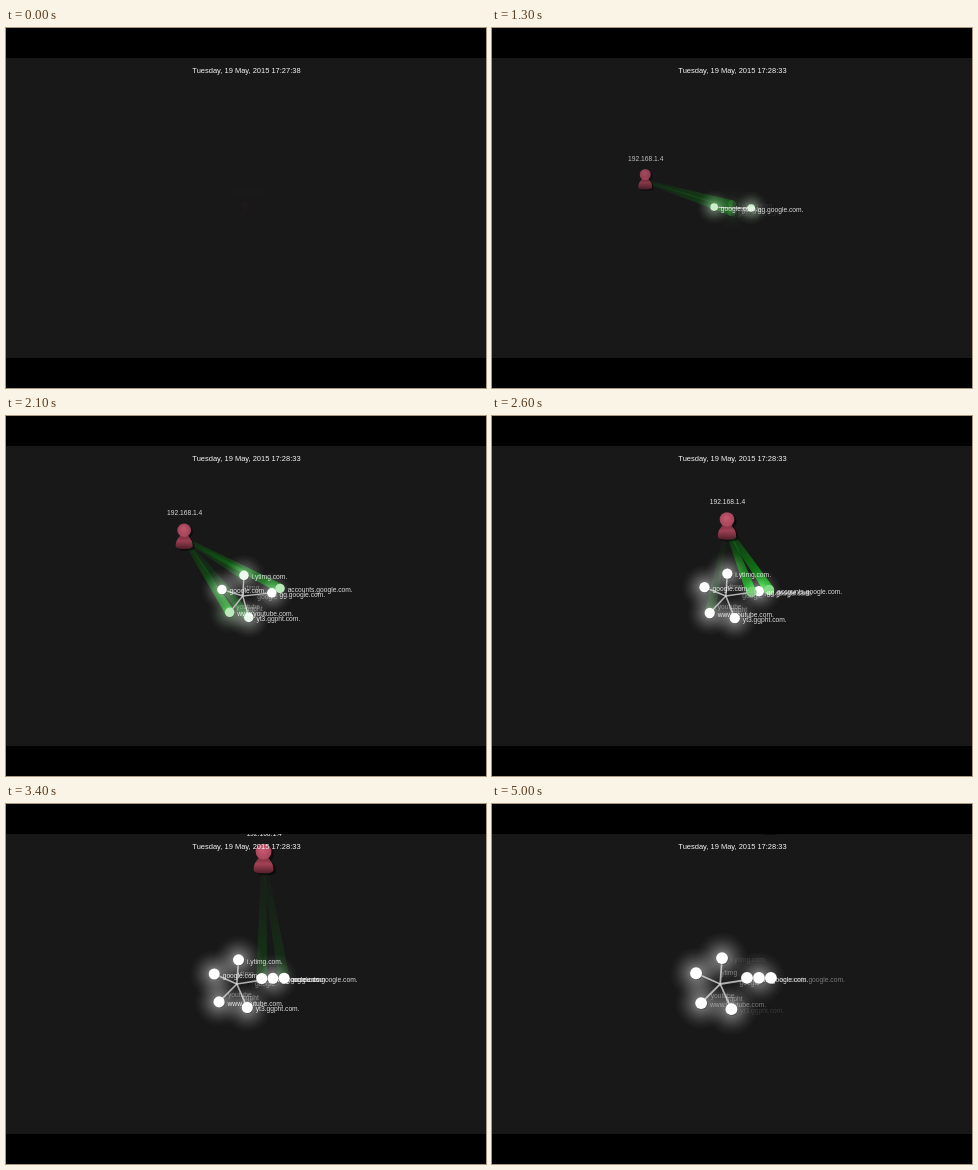
Animation of 480 by 360 pixels, one loop 5.1 s. Source, as an HTML page with a canvas:

```html
<!DOCTYPE html>
<html lang="en">
<head>
<meta charset="utf-8">
<title>Request graph</title>
<style>
  html, body { margin: 0; width: 100%; height: 100%; overflow: hidden; background: #000; }
  canvas { display: block; width: 100%; height: 100%; }
</style>
</head>
<body>
<canvas id="stage" width="480" height="360"></canvas>
<script>
const ctx = document.getElementById('stage').getContext('2d');
const LOOP = 5100, STEP = 100;
const FONT = '"Liberation Sans", Arial, sans-serif';

const clamp = v => Math.max(0, Math.min(1, v));
const ramp = (t, a, b) => clamp((t - a) / (b - a));
const settle = (t, tau) => 1 - Math.exp(-Math.max(0, t) / tau);
const mix = (a, b, u) => a.map((v, i) => v + (b[i] - v) * u);
const polar = (deg, r) => [r * Math.cos(deg * Math.PI / 180), r * Math.sin(deg * Math.PI / 180)];
const add = (p, q) => [p[0] + q[0], p[1] + q[1]];

const zoom = t => Math.max(.5, 1.1 - .53 * Math.exp(-(t - 900) / 1600));
const hub = t => [240 - 13 * settle(t - 1700, 1400), 180];

// The user wanders between these points, then drifts off the top
const stops = [
  { t: 0, at: [240, 178] }, { t: 550, at: [157, 174] }, { t: 900, at: [169, 171] },
  { t: 1700, at: [137.5, 122] }, { t: 2600, at: [235, 103.5] }
];
const exit = [280, -8];

function userPos(t) {
  const next = stops.findIndex(p => p.t > t);
  const last = stops[stops.length - 1];
  if (next < 0) return mix(last.at, exit, settle(t - last.t, 1150));
  const a = stops[next - 1], b = stops[next], u = ramp(t, a.t, b.t);
  return mix(a.at, b.at, u * u * (3 - 2 * u));
}

// Folders swing round the hub from one [angle, radius] to another
const dirs = [
  { born: 650, from: [183, 27], to: [204, 25], files: [{ name: 'google.com.' }] },
  { born: 1250, name: 'ytimg', from: [-88, 25], to: [-86, 24.5], files: [{ name: 'i.ytimg.com.', hits: [1250] }] },
  { born: 1250, name: 'ggpht', from: [92, 28], to: [66, 26], files: [{ name: 'yt3.ggpht.com.', hits: [1250] }] },
  { born: 1550, name: 'youtube', from: [115, 28], to: [135, 25.5], files: [{ name: 'www.youtube.com.', hits: [1550] }] },
  { born: 650, name: 'google', from: [0, 29], to: [-9, 37], files: [
    { name: 'gg.google.com.' },
    { name: 'accounts.google.com.', born: 1550, slot: 1, hits: [1550, 2350] },
    { name: 'www.google.com.', born: 2400, slot: -1, hits: [2400] }
  ] }
];

const swing = t => settle(t - 1700, 350);

function dirPos(d, t) {
  const [angle, r] = mix(d.from, d.to, swing(t));
  return add(hub(t), polar(angle, r * zoom(t) * settle(t - d.born, 200)));
}

// Files sharing a folder stand in a row that turns level
function filePos(f, dirAt, t) {
  const gap = 11.3 * (f.slot || 0) * zoom(t) * settle(t - f.born, 150);
  return add(dirAt, polar(-90 * (1 - swing(t)), gap));
}

function text(str, x, y, size, alpha, align = 'left') {
  if (alpha <= 0) return;
  ctx.font = size + 'px ' + FONT;
  ctx.textAlign = align;
  ctx.fillStyle = `rgba(255,255,255,${alpha})`;
  ctx.fillText(str, x, y);
}

function disc(x, y, r, fill) {
  ctx.fillStyle = fill;
  ctx.beginPath();
  ctx.arc(x, y, r, 0, 7);
  ctx.fill();
}

function drawGlow([x, y], r, rgb, alpha) {
  const g = ctx.createRadialGradient(x, y, 0, x, y, r);
  for (let i = 0; i <= 5; i++) {
    g.addColorStop(i / 5, `rgba(${rgb},${alpha * (1 - i / 5) ** 1.5})`);
  }
  disc(x, y, r, g);
}

function drawBeam([x0, y0], [x1, y1], s, alpha) {
  const g = ctx.createLinearGradient(x0, y0, x1, y1);
  g.addColorStop(0, `rgba(0,150,10,${alpha * .15})`);
  g.addColorStop(1, `rgba(10,195,20,${alpha})`);
  const len = Math.hypot(x1 - x0, y1 - y0);
  ctx.save();
  ctx.fillStyle = g;
  ctx.beginPath();
  const side = (x, y, w) => ctx.lineTo(x - (y1 - y0) / len * w * s, y + (x1 - x0) / len * w * s);
  side(x0, y0, 2.5);
  side(x1, y1, 5.5);
  side(x1, y1, -5.5);
  side(x0, y0, -2.5);
  ctx.fill();
  ctx.restore();
}

function bust(headFill, bodyFill) {
  ctx.fillStyle = bodyFill;
  ctx.beginPath();
  ctx.moveTo(-4.5, 5);
  ctx.bezierCurveTo(-6, 10, -10, 10, -10, 19);
  ctx.quadraticCurveTo(-9, 22, 0, 22);
  ctx.quadraticCurveTo(9, 22, 10, 19);
  ctx.bezierCurveTo(10, 10, 6, 10, 4.5, 5);
  ctx.fill();
  disc(0, 0, 8, headFill);
}

function drawUser([x, y], s, alpha) {
  ctx.save();
  ctx.globalAlpha = alpha;
  ctx.translate(x, y);
  ctx.scale(s, s);
  ctx.save();
  ctx.translate(2.5, 2);
  bust('rgba(0,0,0,.5)', 'rgba(0,0,0,.5)');
  ctx.restore();
  const head = ctx.createRadialGradient(-1, -2, 1, 0, 0, 8.5);
  head.addColorStop(0, '#cb5a73');
  head.addColorStop(1, '#a9455b');
  const body = ctx.createLinearGradient(0, 6, 0, 22);
  body.addColorStop(0, '#84303f');
  body.addColorStop(.4, '#a44257');
  body.addColorStop(1, '#55202b');
  bust(head, body);
  ctx.restore();
  text('192.168.1.4', x + .5, y - 8 - 8 * s, 6.7, alpha * .92, 'center');
}

// Everything needed to paint one file at time t
function fileState(f, d, at, t) {
  const born = f.born || d.born;
  const hits = f.hits || [];
  const touched = Math.max(born, ...hits.filter(h => h <= t));
  const white = ramp(t, touched, touched + 950);
  const rb = Math.round(90 + 165 * white), g = Math.round(205 + 50 * white);
  return {
    name: f.name, hits, born,
    pos: filePos({ slot: f.slot, born }, at, t),
    rgb: `${rb},${g},${rb}`,
    alpha: ramp(t, born, born + 250),
    label: .85 * ramp(t, born, born + 400) * (1 - ramp(t, born + 3000, born + 3900))
  };
}

function draw(t) {
  const s = zoom(t), centre = hub(t), user = userPos(t);
  const folders = dirs.filter(d => t >= d.born).map(d => {
    const at = dirPos(d, t);
    const files = d.files.map(f => fileState(f, d, at, t)).filter(f => t >= f.born);
    return { name: d.name, at, files, alpha: files[0].alpha };
  });
  const files = folders.flatMap(d => d.files);

  ctx.fillStyle = '#000';
  ctx.fillRect(0, 0, 480, 360);
  ctx.save();
  ctx.beginPath();
  ctx.rect(0, 30, 480, 300);
  ctx.clip();
  ctx.fillStyle = '#181818';
  ctx.fillRect(0, 30, 480, 300);

  for (const f of files) {
    for (const hit of f.hits) {
      const alpha = .9 * ramp(t, hit, hit + 150) * (1 - ramp(t, hit, hit + 1250));
      if (alpha > 0) drawBeam([user[0], user[1] + 10 * s], f.pos, s, alpha);
    }
  }

  ctx.globalCompositeOperation = 'lighter';
  for (const d of folders) drawGlow(d.at, 25 * s, d.files[0].rgb, .48 * d.alpha);
  ctx.globalCompositeOperation = 'source-over';

  ctx.lineWidth = 1.7 * s;
  for (const d of folders) {
    ctx.strokeStyle = `rgba(225,225,225,${.75 * d.alpha})`;
    ctx.beginPath();
    ctx.moveTo(...centre);
    ctx.lineTo(...d.at);
    ctx.stroke();
  }

  for (const f of files) {
    const [x, y] = f.pos;
    disc(x + .8 * s, y + .8 * s, 5.6 * s, `rgba(0,0,0,${.2 * f.alpha})`);
    disc(x, y, 5.6 * s, `rgba(${f.rgb},${f.alpha})`);
  }

  drawUser(user, s, .03 + .97 * settle(t, 850));

  for (const d of folders) {
    if (!d.name) continue;
    const [x, y] = mix(centre, d.at, .5);
    text(d.name, x, y + 4.4, 6.7, .4 * d.alpha);
  }
  for (const f of files) text(f.name, f.pos[0] + 2.5 + 6 * s, f.pos[1] + 3.8, 6.7, f.label);

  text('Tuesday, 19 May, 2015 17:' + (t < 100 ? '27:38' : '28:33'), 240.5, 45, 7.5, .95, 'center');
  ctx.restore();
}

const start = performance.now();
function tick() {
  const t = (performance.now() - start) % LOOP;
  draw(Math.floor(t / STEP) * STEP);
  requestAnimationFrame(tick);
}
tick();
</script>
</body>
</html>
```
